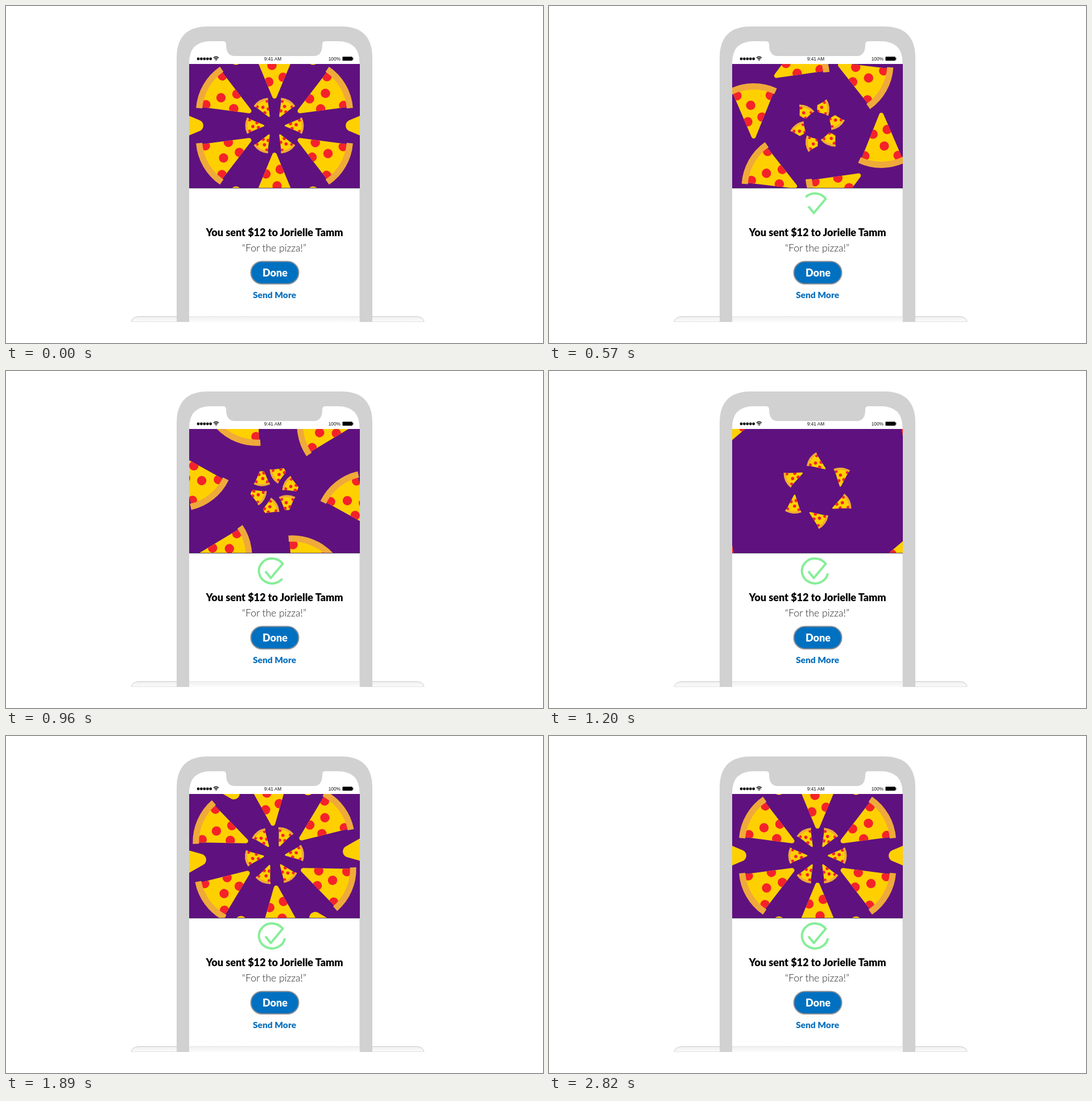
An HTML page with a canvas that plays this animation: 944x593 px, repeating every 2850 ms.

```html
<!DOCTYPE html>
<html lang="en">
<head>
<meta charset="utf-8">
<title>Pizza payment</title>
<style>
  html, body { margin: 0; width: 100%; height: 100%; overflow: hidden; background: #fff; }
  svg, canvas { position: absolute; display: block; }
  svg { left: 0; top: 0; }
  canvas { left: 322px; top: 102px; }
  text { font-family: Lato, "Open Sans", sans-serif; text-anchor: middle; }
  .status { font: 8.3px "Liberation Sans", Arial, sans-serif; fill: #111; }
  .heavy { font-weight: 900; }
</style>
</head>
<body>
<svg width="944" height="593" viewBox="0 0 944 593">
  <defs>
    <linearGradient id="desk" x1="0" y1="0" x2="0" y2="1">
      <stop offset="0" stop-color="#f1f1f1"/>
      <stop offset="1" stop-color="#fbfbfb"/>
    </linearGradient>
  </defs>
  <path d="M220 556Q222 547 234 547H722Q733 547 735 556Z" fill="url(#desk)"/>
  <path d="M220 555.5Q222 547 234 546.5H300M644 546.5H722Q733 547 735 555.5" fill="none" stroke="#c9c9c9"/>
  <path d="M220 555.5H735" stroke="#e2e2e2"/>
  <path d="M300 556V91Q300 36 355 36H589Q644 36 644 91V556Z" fill="#d1d1d1"/>
  <path d="M322 556V100Q322 62 360 62H382Q387 62 387 68Q387 88 402 88H541Q556 88 556 68Q556 62 561 62H583Q621.500 62 621.500 100V556Z" fill="#fff"/>
  <path d="M322 547H621.500V556H322Z" fill="url(#desk)"/>
  <path d="M322 546.500H621.500" stroke="#e4e4e4"/>

  <path d="M338 93H360" stroke="#000" stroke-width="4.800" stroke-linecap="round" stroke-dasharray="0 5.400"/>
  <g fill="none" stroke="#000" stroke-width="1.300">
    <path d="M364.700 91.300Q369.300 87.300 373.900 91.300M366.400 93.300Q369.300 90.800 372.200 93.300"/>
  </g>
  <path d="M367.800 94.500Q369.300 93.200 370.800 94.500L369.300 96.300Z"/>
  <text class="status" x="469" y="95.800">9:41 AM</text>
  <text class="status" x="577.300" y="95.800">100%</text>
  <rect x="591.500" y="89.300" width="17.500" height="7" rx="1"/>
  <path d="M609.800 91.200V94.600" stroke="#000" stroke-width="1.200"/>

  <path id="tick" d="M456 352.500L465.500 364.300L486.500 339.300A23 22 0 1 0 490.200 356" fill="none"
    stroke="#86ee98" stroke-width="4" stroke-linejoin="round" pathLength="100" stroke-dasharray="100 200"/>

  <text class="heavy" x="472" y="405" font-size="18">You sent $12 to Jorielle Tamm</text>
  <text x="471.500" y="431.500" font-size="17.500" font-weight="300" fill="#222">“For the pizza!”</text>
  <rect x="430.500" y="449.500" width="84" height="39.500" rx="19.500" fill="#0070c0" stroke="#8b9097" stroke-width="2"/>
  <text class="heavy" x="473" y="475.500" font-size="18" fill="#fff">Done</text>
  <text class="heavy" x="472" y="514" font-size="15.500" fill="#0a70be">Send More</text>
</svg>
<canvas id="pic" width="300" height="219"></canvas>

<script>
const LOOP = 2850, STEP = 30;
const tick = document.getElementById('tick');
const ctx = document.getElementById('pic').getContext('2d');
const rad = deg => deg * Math.PI / 180;

const TIMES = [0, 300, 780, 1200, 1890, 2340, 2820];
const SPIN = [0, -14, -147, -305, -358, -360, -360];
const CUT = [0, 35, 35, 0, 0, 0, 0];
const TOPPINGS = [[59, 4.500], [38, -15], [30, 10], [76, 28.500], [76, -30]];

// size: slice scale, base: first slice's angle, dist: slice centre from the middle
const RINGS = [
  { size: 2.600, base: 0, dist: [254, 343, 285, 460, 249, 248, 254],
    turn: [0, -11, -75, -135, -175, -180, -180] },
  { size: 1, base: 30, dist: [97, 132, 105, 191, 102, 95, 97],
    turn: [0, -11, -75, -127, -175.500, -180, -180] },
  { size: 0.345, base: 0, dist: [35, 42, 23, 48, 35.500, 34, 35], cut: CUT,
    turn: [0, -10, -70, -150, -175, -180, -180] }
];

// Smooth curve through the keys without overshoot
function curve(vals, t) {
  const last = TIMES.length - 1;
  const rise = k => (vals[k + 1] - vals[k]) / (TIMES[k + 1] - TIMES[k]);
  const slope = k => {
    if (k === 0 || k === last) return 0;
    const a = rise(k - 1), b = rise(k);
    return a * b > 0 ? 2 * a * b / (a + b) : 0;
  };
  let i = 0;
  while (i < last - 1 && t > TIMES[i + 1]) i++;
  const span = TIMES[i + 1] - TIMES[i];
  const u = Math.min(1, (t - TIMES[i]) / span), v = 1 - u;
  return v * v * (1 + 2 * u) * vals[i] + u * u * (3 - 2 * u) * vals[i + 1]
    + span * u * v * (v * slope(i) - u * slope(i + 1));
}

// Tip at the origin, crust 97 units to the right
function drawSlice(cut) {
  if (cut > 0.500) {
    ctx.beginPath();
    ctx.arc(95, 0, 95 - cut, 0, 7);
    ctx.clip();
  }
  ctx.save();
  ctx.beginPath();
  ctx.moveTo(81, -36);
  ctx.arcTo(-6, 0, 81, 36, 4);
  ctx.lineTo(81, 36);
  ctx.arc(0, 0, 88.600, rad(24), rad(-24), true);
  ctx.closePath();
  ctx.fillStyle = '#ffd000';
  ctx.fill();
  ctx.clip();
  ctx.fillStyle = '#f5222a';
  for (const [x, y] of TOPPINGS) {
    ctx.beginPath();
    ctx.arc(x, -y, 8.200, 0, 7);
    ctx.fill();
  }
  ctx.restore();
  ctx.beginPath();
  ctx.arc(0, 0, 92, rad(-25.500), rad(25.500));
  ctx.lineWidth = 11;
  ctx.strokeStyle = '#efaa3a';
  ctx.stroke();
}

function drawRing(ring, t) {
  const dist = curve(ring.dist, t), turn = curve(ring.turn, t);
  const spin = curve(SPIN, t), cut = ring.cut ? curve(ring.cut, t) : 0;
  for (let i = 0; i < 6; i++) {
    ctx.save();
    ctx.translate(150, 108.500);
    ctx.rotate(-rad(ring.base + turn + i * 60));
    ctx.translate(dist, 0);
    ctx.rotate(-rad(spin));
    ctx.scale(ring.size, ring.size);
    ctx.translate(-50, 0);
    drawSlice(cut);
    ctx.restore();
  }
}

function render(t) {
  ctx.fillStyle = '#5f117f';
  ctx.fillRect(0, 0, 300, 219);
  RINGS.forEach(ring => drawRing(ring, t));
  ctx.fillStyle = '#54456b';
  ctx.fillRect(0, 218, 300, 1);

  const u = Math.max(0, Math.min(1, (t - 330) / 900));
  const drawn = 1 - Math.pow(1 - u, 2.300);
  tick.style.visibility = drawn > 0 ? 'visible' : 'hidden';
  tick.setAttribute('stroke-dasharray', `${100 * drawn} 200`);
}

const start = performance.now();
function loop() {
  const t = (performance.now() - start) % LOOP;
  render(Math.floor(t / STEP) * STEP);
  requestAnimationFrame(loop);
}
loop();
</script>
</body>
</html>
```
